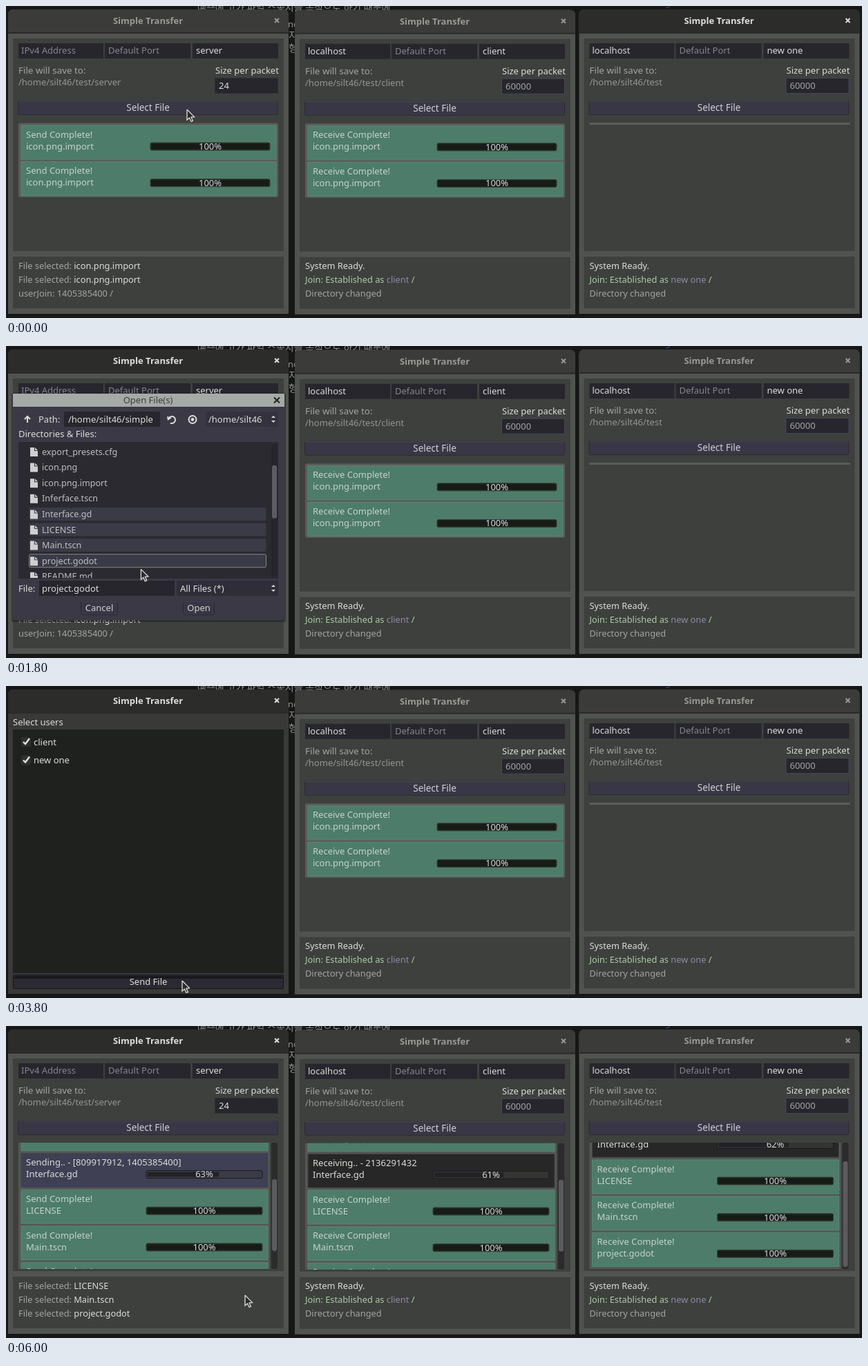
These frames come from a looping animation (1239 by 452 pixels, 6.1 s). An HTML page with a canvas:

```html
<!DOCTYPE html>
<html lang="en">
<head>
<meta charset="utf-8">
<title>Simple Transfer</title>
<style>
html, body { margin: 0; width: 100%; height: 100%; overflow: hidden; background: #171717; }
canvas { display: block; }
</style>
</head>
<body>
<canvas id="stage" width="1239" height="452"></canvas>
<script>
const ctx = document.getElementById('stage').getContext('2d');
const LOOP = 6100, STEP = 100;
const OPEN_DIALOG = 300, PICK_FIRST = 900, PICK_ALL = 1700, PICK_USERS = 2200, SEND = 3900;
const HOME = '/home/silt46';
const PITCH = 52.7;
const GREEN = '#4d7c6a', FIELD = '#27262d', BUTTON = '#393745', PANEL = '#3e403d', FRAME = '#50534f';
const WHITE = '#dcdcda', GREY = '#a3a4a2', MUTED = '#85858c';

const FILES = ['data', 'result', 'default_env.tres', 'export_presets.cfg', 'icon.png', 'icon.png.import',
  'Inferface.tscn', 'Interface.gd', 'LICENSE', 'Main.tscn', 'project.godot', 'README.md', 'Status.gd', 'Status.tscn'];

// Cursor tip: time, x, y
const CURSOR = [[0, 262, 150], [300, 262, 150], [900, 175, 300], [1500, 175, 300], [1700, 170, 306], [2000, 268, 373],
  [2200, 268, 373], [2400, 265, 382], [2800, 240, 366], [3100, 32, 78], [3300, 34, 104], [3500, 34, 104],
  [3800, 255, 427], [4300, 255, 427], [4800, 346, 390], [LOOP, 346, 390]];

const clamp = (v, lo, hi) => Math.min(hi, Math.max(lo, v));
const ramp = (t, a, b) => clamp((t - a) / (b - a), 0, 1);
const smooth = p => p * p * (3 - 2 * p);

function rect(x, y, w, h, fill, stroke, radius = 0) {
  ctx.beginPath();
  ctx.roundRect(x, y, w, h, radius);
  if (fill) { ctx.fillStyle = fill; ctx.fill(); }
  if (stroke) { ctx.strokeStyle = stroke; ctx.lineWidth = 1; ctx.stroke(); }
}

function path(points, color, width) {
  ctx.beginPath();
  points.forEach(([x, y]) => ctx.lineTo(x, y));
  if (width) {
    ctx.strokeStyle = color;
    ctx.lineWidth = width;
    ctx.stroke();
  } else {
    ctx.fillStyle = color;
    ctx.fill();
  }
}

function text(str, x, y, color = WHITE, { size = 13, weight = 400, align = 'left' } = {}) {
  ctx.font = `${weight} ${size}px "Noto Sans", "Noto Sans CJK KR", sans-serif`;
  ctx.textAlign = align;
  ctx.fillStyle = color;
  ctx.fillText(str, x, y + 4.6);
  return x + ctx.measureText(str).width;
}

const centered = (str, x, y, color, size = 13) => text(str, x, y, color, { size, align: 'center' });

function clipped(x, y, w, h, draw) {
  ctx.save();
  ctx.beginPath();
  ctx.rect(x, y, w, h);
  ctx.clip();
  draw();
  ctx.restore();
}

function cross(x, y, color, r = 3) {
  path([[x - r, y - r], [x + r, y + r]], color, 2);
  path([[x - r, y + r], [x + r, y - r]], color, 2);
}

function button(x, y, w, h, label, size) {
  rect(x, y, w, h, BUTTON, '#2c2b33', 2);
  rect(x + 1, y, w - 2, 1, '#4a4859');
  centered(label, x + w / 2, y + h / 2, '#cfcfd0', size);
}

function desktop() {
  rect(0, 0, 1239, 452, '#171717');
  text('예측에 고가 파일 스송시을 목직으로 하기 때문에', 277, 2, '#8f8f8f', { size: 14 });
  text('nc', 408, 26, '#8f8f8f');
  text('지', 409, 42, '#8f8f8f', { size: 14 });
  text('형', 409, 61, '#8f8f8f', { size: 14 });
  text('signal received', 944, -5, '#3c4a86');
}

function windowFrame(active) {
  rect(3, 5, 406, 441, FRAME, null, [7, 7, 0, 0]);
  rect(3, 5, 406, 34, active ? '#2c2c2b' : '#3b3b39', null, [7, 7, 0, 0]);
  rect(3, 38, 406, 2, '#2b2b2a');
  const color = active ? '#dededc' : '#999996';
  text('Simple Transfer', 205.5, 21.5, color, { weight: 700, align: 'center' });
  cross(392, 21, color);
}

function transferRow(y, row, width) {
  const { file, done, pct, status } = row;
  const narrow = width < 360;
  const fill = done ? GREEN : row.sending ? '#3f4054' : '#272727';
  rect(22, y, width, 49, fill, done ? '#5a8574' : '#454549');
  const color = done ? '#c6d2cb' : WHITE;
  text(status, 29, y + 13, color);
  text(file, 29, y + 30, color);
  const bx = narrow ? 203 : 209, bw = narrow ? 168 : 173;
  rect(bx, y + 25, bw, 11, done ? '#1b221d' : row.sending ? '#3b3b47' : '#343433', done ? '#383c32' : '#191919', 2);
  rect(bx + 2, y + 27, (bw - 4) * pct / 100, 7, done ? '#161b18' : '#222226');
  centered(Math.round(pct) + '%', bx + bw / 2, y + 30.3, '#dadada');
}

function transferList(rows, scroll, thumb) {
  if (!rows.length) return rect(18, 169, 377, 3, '#5b5d59');
  if (!thumb) {
    rect(18, 169.5, 376, rows.length * PITCH + 2, '#5a5d59', null, 2);
    rows.forEach((row, i) => transferRow(173 + i * PITCH, row, 369));
    return;
  }
  clipped(17, 169, 378, 183, () => {
    rect(18, 169, 364, 183, '#545754');
    rows.forEach((row, i) => transferRow(173 + i * PITCH - scroll, row, 357));
    rect(384, 169, 9, 183, '#2b2b2b', null, 3);
    rect(385, thumb[0], 7, thumb[1] - thumb[0], '#5b5b5f', null, 3);
  });
}

function mainPanel(w, t) {
  rect(10, 47, 392, 308, PANEL);
  rect(10, 363, 392, 75, PANEL);
  [[18, 123, w.address], [143, 124, 'Default Port'], [270, 124, w.name]].forEach(([x, width, label], i) => {
    rect(x, 54, width, 22, FIELD);
    text(label, x + (i ? 5 : 4), 64.5, i === 1 || label === 'IPv4 Address' ? MUTED : WHITE);
  });
  text('File will save to:', 18, 93.5, GREY, { size: 13.4 });
  text(HOME + w.folder, 18, 110.5, '#949592');
  text('Size per packet', 303, 93.5, WHITE);
  rect(302.5, 104.5, 91, 22, FIELD, w.packet === '24' ? '#302f38' : '#47465a');
  text(w.packet, 308, 115.5, w.packet === '24' ? WHITE : GREY);
  button(17.5, 137.5, 376, 20, 'Select File', 13.5);
  const sent = t >= SEND;
  transferList(w.rows(t), w.scroll, sent && w.thumb);
}

function logLines(lines, dy) {
  lines.forEach((parts, i) => {
    let x = 18;
    parts.forEach(([str, color]) => { x = text(str, x, 376.8 + i * 19.8 - dy, color, { size: 12.8 }); });
  });
}

const finished = (status, file) => ({ status, file, pct: 100, done: true });

function liveRows(t, sending, interfacePct, licensePct) {
  if (t < SEND) return [];
  const since = t - 4200;
  const progress = {
    'Interface.gd': interfacePct + since * (sending ? .0294 : interfacePct > 9 ? .0293 : .0289),
    'LICENSE': licensePct + since * .085,
    'Main.tscn': (t - SEND) / 3,
    'project.godot': 30 + since * .085
  };
  return Object.entries(progress).map(([file, value]) => {
    const pct = clamp(value, 0, 100), done = pct === 100;
    const status = done ? (sending ? 'Send' : 'Receive') + ' Complete!'
      : sending ? 'Sending.. - [809917912, 1405385400]' : 'Receiving.. - 2136291432';
    return { file, pct, done, status, sending };
  });
}

const twice = status => [finished(status, 'icon.png.import'), finished(status, 'icon.png.import')];
const selected = name => [['File selected: ', GREY], [name, WHITE]];
const joinedLog = name => [[['System Ready.', WHITE]],
  [['Join: Established as ', '#a9cda5'], [name, '#8d88a8'], [' /', '#a9cda5']], [['Directory changed', GREY]]];

const WINDOWS = [
  { x: 0, y: 0, address: 'IPv4 Address', name: 'server', folder: '/test/server', packet: '24',
    scroll: 93.9, thumb: [222, 326],
    rows: t => [...twice('Send Complete!'), ...liveRows(t, true, 10, 30)],
    log: t => t < SEND
      ? [selected('icon.png.import'), selected('icon.png.import'), [['userJoin: 1405385400 /', GREY]]]
      : ['LICENSE', 'Main.tscn', 'project.godot'].map(selected) },
  { x: 415, y: .8, address: 'localhost', name: 'client', folder: '/test/client', packet: '60000',
    scroll: 93.9, thumb: [222, 326],
    rows: t => [...twice('Receive Complete!'), ...liveRows(t, false, 9, 28)],
    log: () => joinedLog('client') },
  { x: 826.5, y: 0, address: 'localhost', name: 'new one', folder: '/test', packet: '60000',
    scroll: 31.7, thumb: [196, 349],
    rows: t => liveRows(t, false, 9.2, 28),
    log: () => joinedLog('new one') }
];

function fileIcon(x, y, folder) {
  const color = '#cfcfd0';
  if (folder) {
    path([[x - 6, y - 5], [x - 1, y - 5], [x + 1, y - 3], [x + 6, y - 3], [x + 6, y + 6], [x - 6, y + 6]], color);
  } else {
    path([[x - 5, y - 6], [x + 1, y - 6], [x + 1, y - 1], [x + 6, y - 1], [x + 6, y + 7], [x - 5, y + 7]], color);
    path([[x + 2, y - 6], [x + 6, y - 2], [x + 2, y - 2]], color);
  }
}

function spinner(x, y) {
  path([[x - 3, y - 2], [x, y - 5], [x + 3, y - 2]], WHITE);
  path([[x - 3, y + 2], [x, y + 5], [x + 3, y + 2]], WHITE);
}

function arc(x, y, r, from, to, width) {
  ctx.beginPath();
  ctx.arc(x, y, r, from, to);
  ctx.strokeStyle = WHITE;
  ctx.lineWidth = width;
  ctx.stroke();
}

function fileDialog(t) {
  rect(8, 68, 397, 332, 'rgba(25,25,28,.45)', null, 3);
  rect(10, 69, 393, 328, '#3b3946');
  rect(10, 69, 393, 19, '#a6aaa6');
  centered('Open File(s)', 205.5, 78, '#3c3e3c');
  cross(392, 78.5, '#222', 4);

  path([[27, 106], [31, 102], [35, 106]], WHITE, 2);
  path([[31, 102], [31, 111]], WHITE, 2);
  text('Path:', 47, 106);
  rect(84, 95, 139, 22, FIELD);
  clipped(88, 95, 131, 22, () => text(HOME + '/simple', 90, 106));
  arc(240, 107, 5, -2.6, 2, 2);
  path([[233, 102], [240, 104], [234, 108]], WHITE);
  arc(270, 106.5, 5.5, 0, 7, 2);
  arc(270, 106.5, 1.2, 0, 7, 2.4);
  rect(289, 95, 105, 22, '#34323e');
  text(HOME, 293, 106);
  spinner(387, 106);

  text('Directories & Files:', 18, 127.5);
  rect(18, 139, 376, 198, '#2b2a31');
  const scroll = 67.8 * Math.round(3 * ramp(t, 1000, 1400)) / 3;
  const last = t >= PICK_ALL ? 10 : 7;
  clipped(18, 140, 376, 196, () => FILES.forEach((name, i) => {
    const y = 153 + i * 22.6 - scroll;
    if (t >= PICK_FIRST && i >= 7 && i <= last) {
      rect(33.5, y - 9.5, 343, 19, '#3b3a47', i === last ? '#85858c' : null, 2);
    }
    fileIcon(40, y, i < 2);
    text(name, 52, y, '#bfbfc1', { size: 12.6 });
  }));
  rect(384, 142, 9, 192, '#26252b', null, 4);
  rect(385, 145 + scroll * .41, 7, 77, '#5d5c65', null, 3);

  text('File:', 18, 351);
  rect(48, 340, 196, 22, FIELD);
  if (t >= PICK_FIRST) text(FILES[last], 52, 351);
  rect(247, 340, 147, 22, '#2f2e38');
  text('All Files (*)', 252, 351);
  spinner(387, 351);
  button(108.5, 369.5, 53, 20, 'Cancel');
  button(256.5, 369.5, 45, 20, 'Open');
}

function userPicker(t) {
  rect(3, 40, 406, 406, '#393a38');
  text('Select users', 10, 52);
  rect(10, 63, 392, 353, '#1f211e');
  [['client', 81, 3100], ['new one', 107.5, 3400]].forEach(([name, y, checkedAt]) => {
    rect(22, y - 7, 14, 14, '#30302f', null, 3);
    if (t >= checkedAt) path([[25, y], [28, y + 3], [34, y - 5]], '#e4e4e2', 2.4);
    text(name, 40, y);
  });
  button(10.5, 418.5, 391, 20, 'Send File');
  if (t >= 3700) {
    rect(10.5, 418.5, 391, 20, '#2b2a32', '#131316', 2);
    rect(12, 420, 388, 4, '#19191d');
    centered('Send File', 206, 428.5, WHITE);
  }
}

function cursor(t) {
  const i = CURSOR.findIndex(key => key[0] > t);
  const [t0, x0, y0] = CURSOR[i - 1], [t1, x1, y1] = CURSOR[i];
  const p = smooth(ramp(t, t0, t1));
  ctx.save();
  ctx.translate(x0 + (x1 - x0) * p, y0 + (y1 - y0) * p);
  const arrow = [[0, 0], [0, 15], [3.4, 12], [6, 17.5], [8.4, 16.4], [6, 11], [10.5, 10.6], [0, 0]];
  path(arrow, '#2b2b2b');
  path(arrow, '#dedede', 1.3);
  ctx.restore();
}

function draw(t) {
  desktop();
  const focused = t < 200 ? 2 : 0;
  WINDOWS.forEach((w, i) => {
    ctx.save();
    ctx.translate(w.x, w.y);
    windowFrame(i === focused);
    if (i === 0 && t >= PICK_USERS && t < SEND) {
      userPicker(t);
    } else {
      mainPanel(w, t);
      logLines(w.log(t), w.y);
    }
    if (i === 0 && t >= OPEN_DIALOG && t < PICK_USERS) fileDialog(t);
    ctx.restore();
  });
  cursor(t);
}

function tick() {
  const t = performance.now() % LOOP;
  draw(Math.floor(t / STEP) * STEP);
  requestAnimationFrame(tick);
}
tick();
</script>
</body>
</html>
```
